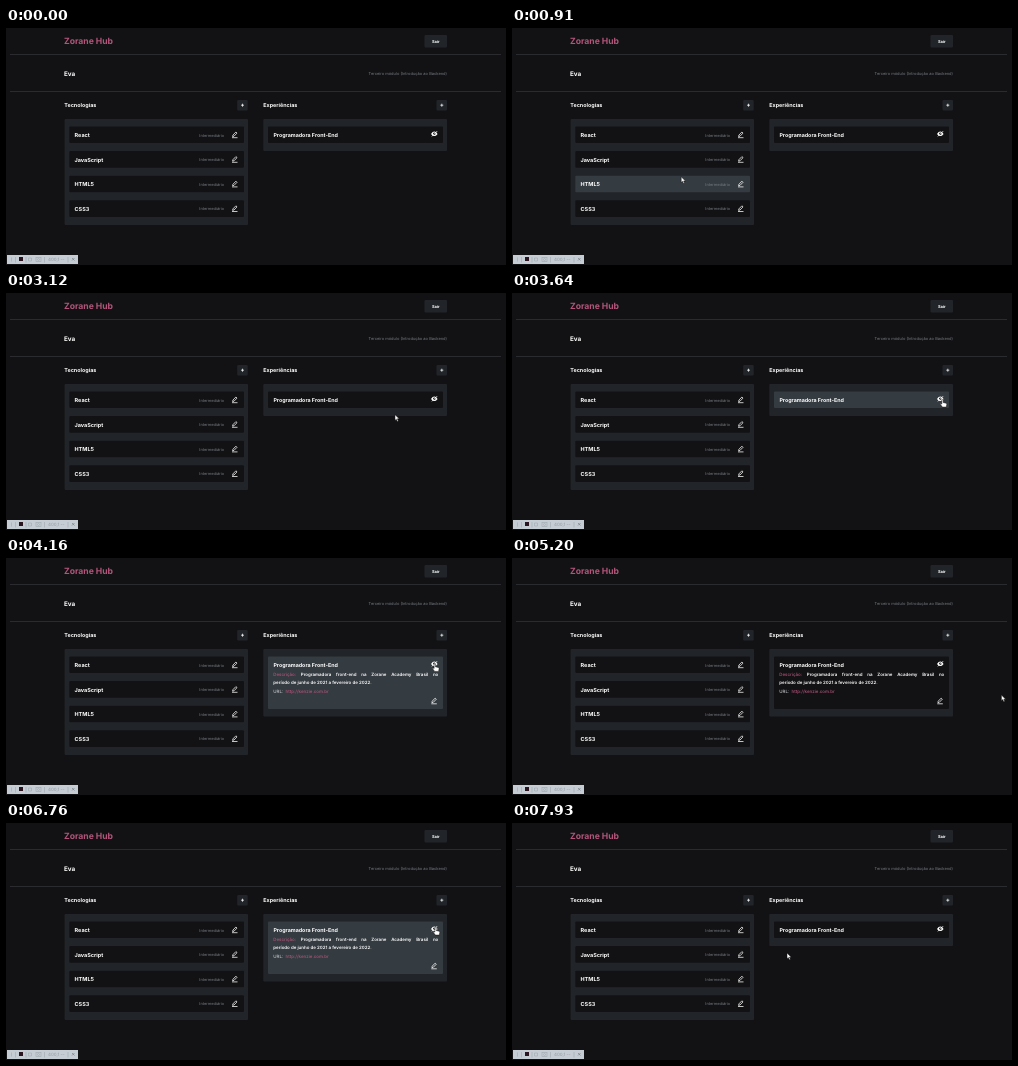
An HTML page for the animation above (8 s loop, 500 by 237 pixels).

```html
<!DOCTYPE html>
<html lang="pt-BR">
<head>
<meta charset="utf-8">
<style>
  html, body { margin: 0; height: 100%; overflow: hidden; background: #121214; }
  svg { display: block; width: 500px; height: 237px; font: 700 5.4px Inter, sans-serif; fill: #fff; text-rendering: geometricPrecision; }
  .bg { fill: #121214; }
  .panel { fill: #212529; }
  .hover { fill: #343b41; }
  .toolbar { fill: #c5ccd3; }
  .muted { font-weight: 400; fill: #777d83; text-anchor: end; }
  .pink { fill: #b3557a; color: #b3557a; font-weight: 500; }
  .line { fill: none; stroke: #fff; stroke-width: .75; }
  .rule { stroke: #303236; stroke-width: .8; }
  p { margin: 0; font: 600 4.45px/7px Inter, sans-serif; color: #fff; white-space: nowrap; text-align-last: justify; }
</style>
</head>
<body>
<svg id="stage" viewBox="0 0 500 237"></svg>
<script>
const LOOP = 8000, STEP = 130, OPEN_AT = 4160, CLOSE_AT = 7280;
const stage = document.getElementById('stage');

const box = (x, y, w, h, cls, id = '') =>
  `<rect id="${id}" x="${x}" y="${y}" width="${w}" height="${h}" rx="1" class="${cls}"/>`;
const text = (x, y, size, str, cls = '') =>
  `<text x="${x}" y="${y}" font-size="${size}" class="${cls}">${str}</text>`;
const pencil = (x, y) =>
  `<path class="line" d="M${x + .6} ${y + 4.9}l.3-1.5 3-3.1 1.1 1.1-3 3.1zM${x} ${y + 6}h5.5"/>`;
const plus = x => box(x, 72, 10.5, 10.5, 'panel') +
  `<path class="line" d="M${x + 3.8} 77.2h3M${x + 5.3} 75.7v3"/>`;

const skills = ['React', 'JavaScript', 'HTML5', 'CSS3'];
const rowY = i => 98.5 + i * 24.6;

const skillRow = (name, i) => {
  const y = rowY(i);
  return box(63.3, y, 174.7, 16.6, 'bg', 'card' + i) + text(68.5, y + 10.4, 5.5, name) +
    text(218, y + 10, 3.95, 'Intermediário', 'muted') + pencil(226, y + 5.2);
};

const toolbar = `
  <rect x="1" y="227" width="71" height="9" class="toolbar"/>
  <g fill="none" stroke="#a0a9b0" stroke-width=".6">
    <path d="M5.500 229.500v4M9.500 229v5.500M20 229v5.500M38.500 229v5.500M62 229v5.500M22.500 230h3v3h-3z"/>
    <rect x="30" y="229.500" width="5" height="4"/><circle cx="32.500" cy="231.500" r="1"/>
  </g>
  <path d="M66 230l2.500 2.500m0-2.500l-2.500 2.500" stroke="#6d757c" stroke-width=".6"/>
  <rect x="13" y="229" width="4" height="4" fill="#2a1520"/>
  <text x="42" y="233" style="font-size:4.5px;font-weight:400;fill:#929ba2">400,1 --</text>`;

stage.innerHTML = `
  <rect width="500" height="237" class="bg"/>
  <text x="58" y="16.300" style="font-size:8.6px;font-weight:700" class="pink">Zorane Hub</text>
  ${box(418.5, 7, 22.5, 12.5, 'panel')}
  <text x="429.800" y="14.800" font-size="4" text-anchor="middle">Sair</text>
  <path class="rule" d="M4 26.500h491M4 63.500h491"/>
  ${text(58, 47.6, 6.3, 'Eva')}
  ${text(441, 46.8, 4, 'Terceiro módulo (Introdução ao Backend)', 'muted')}
  ${text(58.3, 79.2, 5.4, 'Tecnologias')}${plus(231.2)}
  ${text(257.3, 79.2, 5.4, 'Experiências')}${plus(430.5)}
  ${box(58.6, 91, 183.4, 106, 'panel')}
  ${skills.map(skillRow).join('')}
  ${box(257.3, 91, 183.7, 32, 'panel', 'jobPanel')}
  ${box(262, 98.5, 175, 16.6, 'bg', 'job')}
  ${text(267.4, 109, 5.35, 'Programadora Front-End')}
  <path d="M425 105.900Q428.300 101.300 431.600 105.900Q428.300 110.300 425 105.900z"/>
  <circle cx="428.300" cy="105.800" r="1.200" class="bg"/>
  <path class="line" d="M425.900 108.400l5.300-5.300"/>
  <g id="details">
    <foreignObject x="267.300" y="113.700" width="165" height="8">
      <p><span class="pink">Descrição:</span> Programadora front-end na Zorane Academy Brasil no</p>
    </foreignObject>
    <text x="267.300" y="126" style="font-size:4.45px;font-weight:600">período de junho de 2021 a fevereiro de 2022.</text>
    <text x="267.300" y="135" style="font-size:4.45px;font-weight:500;fill:#c3c7cb">URL:</text>
    ${text(279.5, 135, 4.45, 'http://kenzie.com.br', 'pink')}
    ${pencil(425.3, 139.8)}
  </g>
  ${toolbar}
  <g id="cursor" stroke="#111" stroke-width=".5" stroke-linejoin="round">
    <path id="arrow" d="M0 0v5.800l1.300-1.200 1 2.200 1.100-.5-1-2.100h1.900z"/>
    <path id="hand" d="M-.7.600Q0-.500.700.600V3l2.900.700q.800.300.700 1.200l-.5 2.700h-3.900l-2.300-3q.3-1 1.700 0z"/>
  </g>`;

const $ = id => document.getElementById(id);

// Pointer stops: time, x, y
const stops = [
  [0, 30, 246], [1430, 229, 107], [1950, 229, 107],
  [2470, 325, 145], [2600, 325, 145], [3510, 430.5, 106.5],
  [3900, 430.5, 106.5], [4160, 428.8, 105.8], [4810, 489.4, 137],
  [5330, 489.4, 137], [6240, 429.5, 104.5], [7410, 429.5, 104.5], [7930, 275, 130]
];

function pointerAt(t) {
  const next = stops.findIndex(s => s[0] > t);
  if (next < 0) return stops[stops.length - 1].slice(1);
  const [t0, x0, y0] = stops[next - 1], [t1, x1, y1] = stops[next];
  const k = (t - t0) / (t1 - t0), e = k * k * (3 - 2 * k);
  return [x0 + (x1 - x0) * e, y0 + (y1 - y0) * e];
}

function draw(now) {
  const t = Math.floor(now % LOOP / STEP) * STEP;
  const open = t >= OPEN_AT && t < CLOSE_AT;
  const [x, y] = pointerAt(t);
  const inside = (left, top, h) => x > left && x < left + 175 && y > top && y < top + h;
  const near = (ix, iy) => Math.abs(x - ix) < 4 && Math.abs(y - iy) < 4;
  const cardHeight = open ? 52.5 : 16.6;

  skills.forEach((_, i) => $('card' + i).setAttribute('class', inside(63, rowY(i), 16.6) ? 'hover' : 'bg'));
  $('job').setAttribute('class', inside(262, 98.5, cardHeight) ? 'hover' : 'bg');
  $('job').setAttribute('height', cardHeight);
  $('jobPanel').setAttribute('height', open ? 67.5 : 32);
  $('details').style.display = open ? '' : 'none';

  const onIcon = near(428.3, 106) || skills.some((_, i) => near(228.7, rowY(i) + 8.5));
  $('hand').style.display = onIcon ? '' : 'none';
  $('arrow').style.display = onIcon ? 'none' : '';
  $('cursor').setAttribute('transform', `translate(${x} ${y})`);
  requestAnimationFrame(draw);
}
requestAnimationFrame(draw);
</script>
</body>
</html>
```
